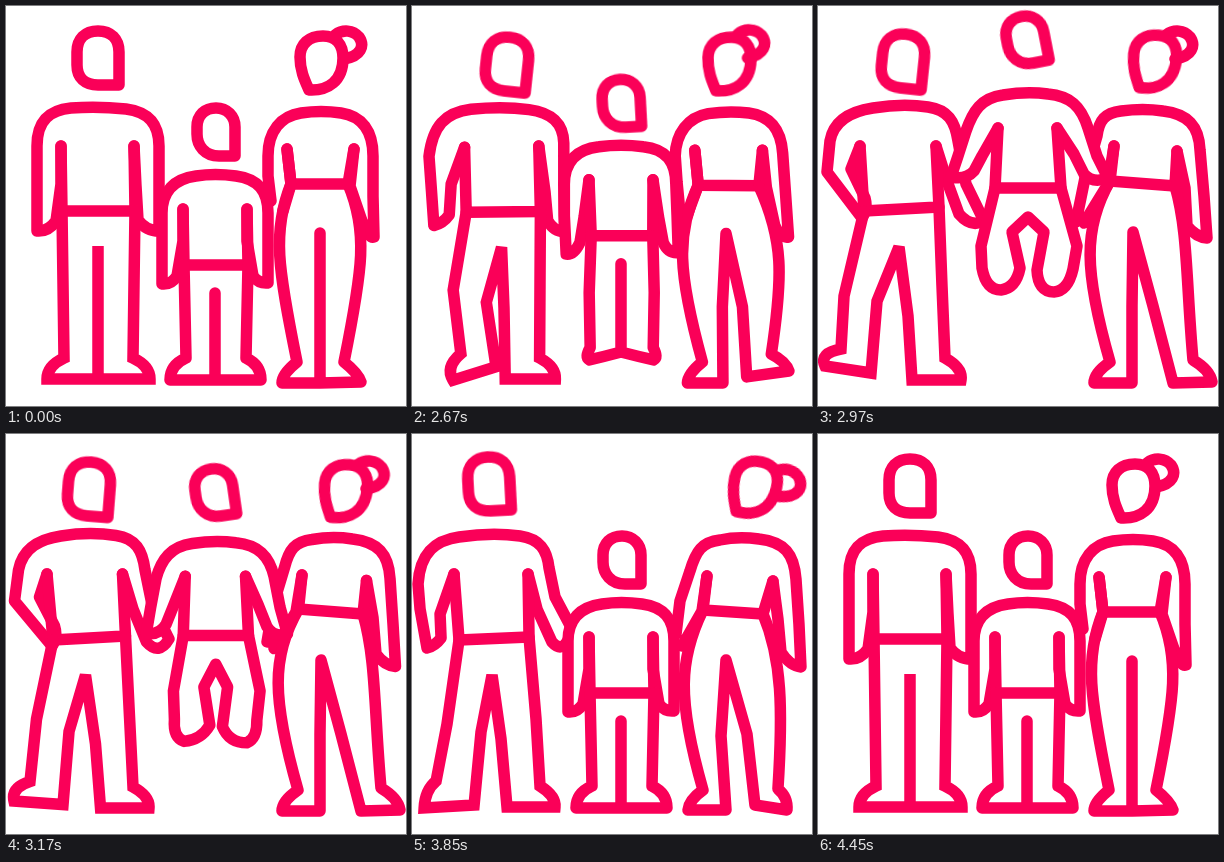
An HTML page for the animation above (4470 ms loop, 400 by 400 pixels).

```html
<!DOCTYPE html>
<html lang="en">
<head>
<meta charset="utf-8">
<title>Family</title>
<style>
html, body { margin: 0; width: 100%; height: 100%; overflow: hidden; background: #fff; }
svg { display: block; width: 100vw; height: 100vh; }
path {
  fill: none; stroke: #fa0058; stroke-width: 11.5;
  stroke-linecap: round; stroke-linejoin: round;
  transform-box: fill-box; transform-origin: center;
  animation: 4470ms linear infinite;
}

/* father */
.dad-head { animation-name: dad-head; }
.dad-arms { animation-name: dad-arms; }
.dad-torso { animation-name: dad-torso; }
.dad-legs { animation-name: dad-legs; stroke-linejoin: miter; stroke-miterlimit: 2; }

@keyframes dad-head {
  0%, 56.3%, 96.5%, to { transform: translate(0, 0) rotate(0deg); }
  61.97% { transform: translate(5px, 10px) rotate(10deg); }
  66.44% { transform: translate(-7px, 3px) rotate(6deg); }
  75.39% { transform: translate(-11px, 3px) rotate(3deg); }
  86.13% { transform: translate(-15px, -2px) rotate(-3deg); }
  89.5% { transform: translate(-9px, -8px) rotate(-2deg); }
}
@keyframes dad-arms {
  0%, 56.3%, 96.5%, to { d: path("M55 140 L55 178 L50 215 Q42 226 31 225 L31 180 L31 140 C31 113 45 104 65 102 Q92 100 120 103 C142 106 153 117 153 140 L153 180 L153 225 Q140 225 132 214 L130 180 L128 140"); }
  61.97% { d: path("M51 142 L29 178 L29 205 Q24 212 16 216 L12 187 L8 157 C14 125 25 108 55 104 Q90 100 115 104 C138 107 150 117 151 135 L151 180 L152 226 Q143 226 138 215 L135 190 L126 140"); }
  66.44% { d: path("M42 140 L33 163 L47 192 Q50 203 44 212 L9 166 L12 135 C16 113 35 105 55 102 Q85 97 110 101 C130 104 137 115 140 135 L148 178 L166 215 Q153 222 141 208 L129 175 L118 140"); }
  75.39% { d: path("M40 140 L34 163 L50 192 Q54 203 48 212 L8 168 L13 137 C18 113 35 105 55 102 Q82 98 110 102 C130 105 136 118 138 137 L144 163 L160 195 Q153 222 140 208 L125 175 L115 140"); }
  86.13% { d: path("M42 140 L28 180 L29 204 Q23 212 15 214 L8 175 L6 150 C8 117 25 106 47 103 Q80 98 108 102 C128 105 135 116 137 134 L143 163 L160 195 Q153 222 140 208 L125 175 L116 140"); }
}
@keyframes dad-torso {
  0%, 56.3%, 96.5%, to { d: path("M55 140 L56 205 L129 205 L128 140"); }
  61.97% { d: path("M51 142 L53 207 L128 206 L126 140"); }
  66.44% { d: path("M42 140 L46 205 L121 201 L118 140"); }
  75.39% { d: path("M40 140 L48 207 L118 203 L115 140"); }
  86.13% { d: path("M42 140 L47 206 L117 203 L116 140"); }
}
@keyframes dad-legs {
  0%, 56.3%, 95%, to { d: path("M56 205 L57 278 L58 352 Q41 360 41 373 L92 373 L92 306 L92 240 L92 306 L92 373 L144 373 Q144 360 127 352 L128 278 L129 205"); }
  61.97% { d: path("M53 207 L31 288 L43 345 Q28 362 41 375 L79 353 L63 290 L88 242 L92 300 L94 373 L143 373 Q144 361 128 352 L128 278 L128 206"); }
  66.44% { d: path("M46 205 L26 290 L23 343 Q1 347 7 360 L53 367 L59 295 L81 241 L90 310 L94 374 L143 374 Q145 362 127 352 L124 280 L121 201"); }
  75.39% { d: path("M48 207 L35 280 L25 352 Q9 360 9 374 L61 374 L67 300 L78 241 L89 310 L95 374 L143 374 Q143 362 127 354 L123 285 L118 203"); }
  86.13% { d: path("M47 206 L35 290 L24 347 Q13 356 12 374 L62 371 L69 298 L80 241 L89 305 L95 373 L143 373 Q144 362 128 352 L124 285 L117 203"); }
  89.5% { d: path("M50 206 L37 288 L40 346 Q27 360 33 372 L76 362 L72 296 L84 241 L90 305 L95 373 L143 373 Q144 361 128 352 L125 282 L121 204"); }
}

/* child: white arms cover the hands behind them */
.kid-head { animation-name: kid-head; }
.kid-arms { animation-name: kid-arms; fill: #fff; }
.kid-torso { animation-name: kid-torso; }
.kid-legs { animation-name: kid-legs; }

@keyframes kid-head {
  0%, 56.3%, 83%, to { transform: translate(0, 0) rotate(0deg); }
  61.97% { transform: translate(-1px, -47px) rotate(-5deg); }
  66.44%, 68.23% { transform: translate(-2px, -92px) rotate(-11deg); animation-timing-function: ease-in; }
  74.3%, 75.39% { transform: translate(0, 3px) rotate(0deg); }
}
@keyframes kid-arms {
  0%, 56.3%, 83%, to { d: path("M177 203 L177 235 L171 270 Q165 279 156 278 L156 240 L156 207 C156 185 168 173 190 170 Q209 167 230 170 C252 173 262 185 262 207 L262 240 L262 277 Q253 278 247 270 L241 235 L241 203"); }
  61.97% { d: path("M177 155 L169 195 L166 215 Q160 230 153 229 L150 190 L150 160 C150 137 162 124 185 122 Q209 119 232 122 C256 124 265 138 265 160 L267 190 L269 227 Q258 228 254 215 L250 195 L241 155"); }
  66.44%, 68.23% { animation-timing-function: ease-in; d: path("M180 122 L164 150 L156 165 Q148 174 133 171 L140 150 L148 125 C155 105 163 92 185 89 Q209 85 230 88 C252 90 263 100 270 122 L279 150 L290 172 Q275 178 266 168 L256 148 L239 122"); }
  74.3%, 75.39% { d: path("M177 200 L177 235 L172 262 Q168 280 161 280 L158 240 L156 200 C156 183 170 171 190 168 Q209 166 230 168 C252 171 264 183 263 203 L260 240 L257 280 Q248 278 246 262 L241 235 L241 200"); }
}
@keyframes kid-torso {
  0%, 56.3%, 83%, to { d: path("M177 203 L178 259 L242 259 L241 203"); }
  61.97% { d: path("M177 155 L180 211 L240 211 L241 155"); }
  66.44%, 68.23% { animation-timing-function: ease-in; d: path("M180 122 L177 182 L243 182 L239 122"); }
  74.3%, 75.39% { d: path("M177 200 L178 257 L241 257 L241 200"); }
}
@keyframes kid-legs {
  0%, 56.3%, 83%, to { d: path("M178 259 L179 305 L180 352 Q164 359 164 374 Q187 374 209 374 L209 330 L209 287 L209 330 L209 374 Q232 374 255 374 Q255 359 240 352 L241 305 L242 259"); }
  61.97% { d: path("M180 211 L176 275 L177 335 Q178 347 186 341 Q197 335 209 328 L209 285 L209 239 L209 285 L209 328 Q221 335 233 341 Q241 347 242 335 L243 275 L240 211"); }
  66.44%, 68.23% { animation-timing-function: ease-in; d: path("M177 182 L163 240 L164 262 Q168 284 183 284 Q198 282 202 262 L194 226 L210 211 L226 226 L219 264 Q220 286 236 286 Q250 285 255 263 L259 240 L243 182"); }
  74.3%, 75.39% { d: path("M178 257 L180 305 L181 352 Q164 359 164 374 Q187 374 209 374 L209 330 L209 285 L209 330 L209 374 Q232 374 255 374 Q255 359 239 352 L240 305 L241 257"); }
}

/* mother */
.mom-head { animation-name: mom-head; }
.mom-hair { animation-name: mom-hair; }
.mom-arms { animation-name: mom-arms; }
.mom-torso { animation-name: mom-torso; }
.mom-legs { animation-name: mom-legs; }

@keyframes mom-head {
  0%, 56.3%, 96.5%, to { transform: translate(0, 0) rotate(0deg); }
  61.97% { transform: translate(3px, 2px) rotate(3deg); }
  66.44% { transform: translate(21px, -1px) rotate(6deg); }
  75.39% { transform: translate(27px, 2px) rotate(5deg); }
  86.13% { transform: translate(27px, -3px) rotate(13deg); }
  89.5% { transform: translate(20px, -6px) rotate(8deg); }
}
@keyframes mom-hair {
  0%, 56.3%, 96.5%, to { transform: translate(0, 0) rotate(0deg); }
  61.97% { transform: translate(-5px, -2px) rotate(-4deg); }
  66.44% { transform: translate(19px, 0) rotate(0deg); }
  75.39% { transform: translate(26px, 4px) rotate(4deg); }
  86.13% { transform: translate(33px, 11px) rotate(14deg); }
  89.5% { transform: translate(22px, 2px) rotate(8deg); }
}
@keyframes mom-arms {
  0%, 56.3%, 96.5%, to { d: path("M281 143 L285 178 L277 205 M265 195 L262 170 L262 150 C262 125 275 110 295 107 Q315 104 335 107 C356 110 367 125 367 150 L367 190 L368 231 Q363 233 356 215 L344 180 L348 143"); }
  61.97% { d: path("M284 145 L287 180 L273 215 M270 215 L267 180 L264 150 C265 128 277 112 297 108 Q318 105 338 107 C360 110 370 122 373 145 L378 190 L382 231 Q372 232 367 222 L361 182 L352 145"); }
  66.44% { d: path("M296 140 L290 178 L266 217 M258 216 L267 172 L279 130 C281 114 287 107 303 105 Q325 102 345 105 C370 108 381 120 382 144 L386 190 L389 232 Q378 231 369 220 L367 182 L359 145"); }
  75.39% { d: path("M296 142 L290 178 L270 212 M264 200 L268 168 L278 137 C285 117 291 108 309 106 Q327 102 348 105 C374 108 384 120 386 145 L388 190 L390 233 Q379 232 371 220 L367 185 L362 148"); }
  86.13% { d: path("M295 142 L290 177 L270 212 M264 200 L268 167 L278 137 C284 117 290 108 308 106 Q326 102 347 105 C373 108 382 120 384 145 L387 190 L389 233 Q378 232 369 218 L366 185 L361 147"); }
}
@keyframes mom-torso {
  0%, 56.3%, 96.5%, to { d: path("M281 143 L285 178 L342 178 L348 143"); }
  61.97% { d: path("M284 145 L287 180 L350 181 L352 145"); }
  66.44% { d: path("M296 140 L292 175 L357 180 L359 145"); }
  75.39% { d: path("M296 142 L293 175 L357 180 L362 148"); }
  86.13% { d: path("M295 142 L291 176 L351 180 L361 147"); }
}
@keyframes mom-legs {
  0%, 56.3%, 95%, to { d: path("M285 178 C266 225 272 262 291 356 Q276 368 276 377 L314 377 L314 302 L314 227 L314 302 L314 377 L355 376 Q352 367 338 356 C357 262 362 225 342 178"); }
  61.97% { d: path("M287 180 C262 230 262 270 290 356 Q276 367 275 377 L309 377 L308 300 L314 228 L341 300 L348 367 L391 358 Q388 348 373 343 C380 275 378 240 350 181"); }
  66.44% { d: path("M292 175 C265 222 266 265 292 356 Q276 367 276 377 L314 377 L314 300 L315 226 L335 300 L355 377 L394 376 Q392 364 375 354 C368 275 370 225 357 180"); }
  75.39% { d: path("M293 175 C265 222 266 265 292 356 Q276 367 276 377 L314 377 L314 300 L315 226 L335 300 L355 377 L394 376 Q392 364 375 354 C368 275 370 225 357 180"); }
  86.13% { d: path("M291 176 C267 225 265 265 291 356 Q277 366 276 376 L314 376 L309 302 L314 226 L335 300 L343 371 L375 376 Q376 363 366 355 C371 275 370 225 351 180"); }
  89.5% { d: path("M288 178 C266 226 266 264 291 356 Q276 367 276 377 L314 377 L310 302 L314 226 L331 300 L335 367 L370 370 Q370 358 358 350 C368 270 367 225 347 180"); }
}
</style>
</head>
<body>
<svg viewBox="0 0 400 400">
  <path class="dad-head" d="M113 79 L92 79 C79 79 71 72 71 59 L71 46 C71 33 79 25 92 25 C105 25 113 33 113 46 Z"/>
  <path class="dad-arms"/>
  <path class="dad-torso"/>
  <path class="dad-legs"/>

  <path class="mom-hair" d="M329 29 C337 23 347 24 353 31 C359 40 355 50 338 53"/>
  <path class="mom-head" d="M303 84 C322 85 337 75 337 52 C337 38 330 30 317 30 C303 30 294 38 294 51 C294 65 299 75 303 84 Z"/>
  <path class="mom-arms"/>
  <path class="mom-torso"/>
  <path class="mom-legs"/>

  <path class="kid-head" d="M229 150 L213 150 C199 150 191 140 191 128 L191 121 C191 109 199 102 210 102 C221 102 229 110 229 121 Z"/>
  <path class="kid-arms"/>
  <path class="kid-torso"/>
  <path class="kid-legs"/>
</svg>
</body>
</html>
```
